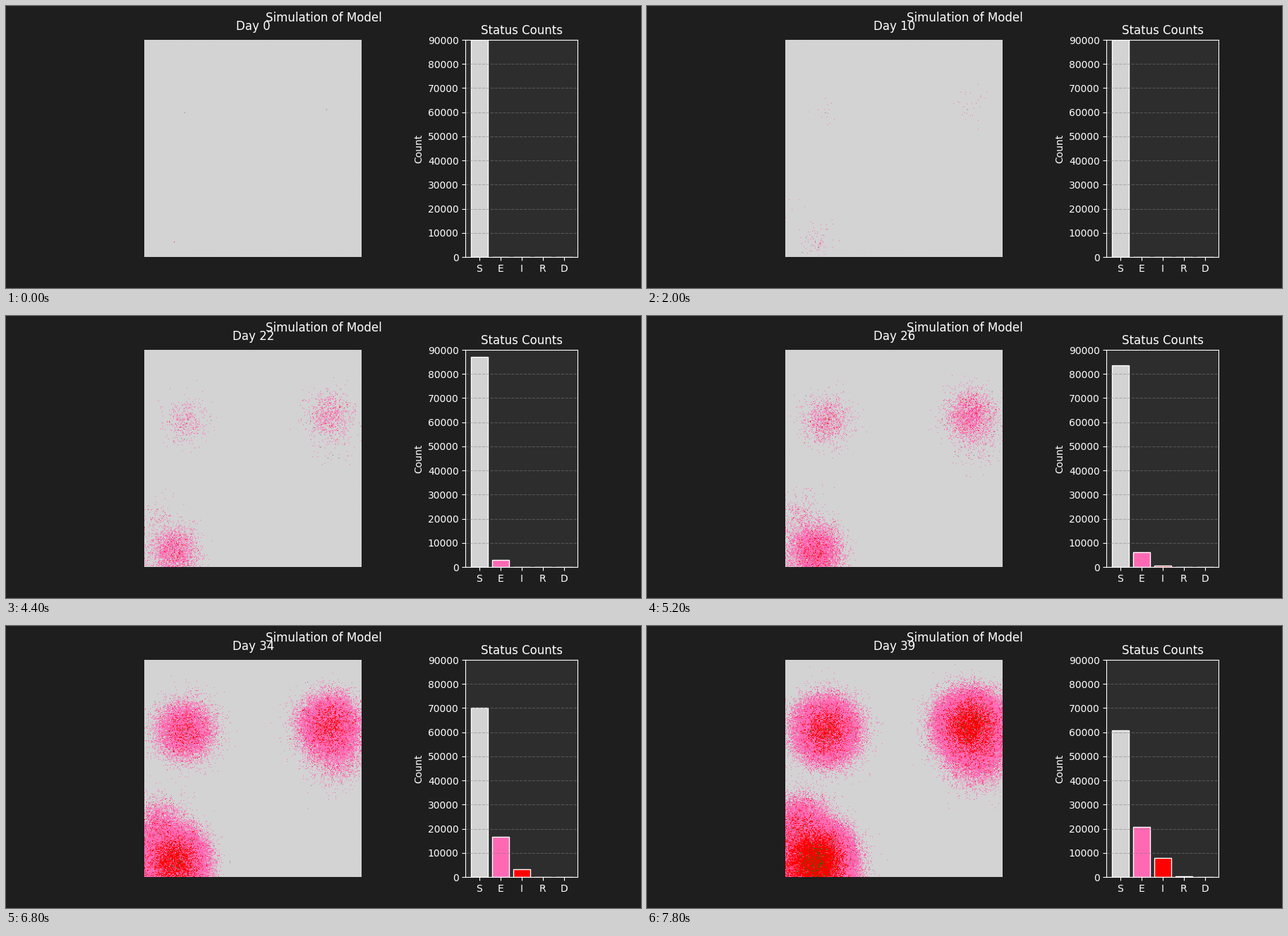
Recreate the animation shown at these times as a matplotlib script. Size 900x400 px, loop 8 s.

```python
import matplotlib.pyplot as plt
import numpy as np
from matplotlib.animation import FuncAnimation
from matplotlib.colors import to_rgb

SIZE, DAYS = 300, 40
BACK, PANEL = "#1e1e1e", "#2d2d2d"
COLORS = ["lightgray", "hotpink", "red", "green", "black"]
RGB = np.array([to_rgb(c) for c in COLORS])
DIM = to_rgb("#697373")

# Cumulative cases follow exp(START + RATE * t - DAMP * t**2)
START, RATE, DAMP = 1.1, 0.4164, 0.00464
GROWTH = 0.28                    # daily log growth of each outbreak
INFECT_LAG, RECOVER_LAG = 11.6, 25.6

# Outbreaks: cell x, y and log size on day 0
OUTBREAKS = [(41, 276, 1.5), (255, 91, 0.4), (56, 97, -0.4),
             (18, 231, -1.5), (266, 129, -2)]
# The first outbreak also piles up at the bottom and left walls
OUTBREAKS += [(41, 324, 1.5), (-41, 276, 1.5)]
SEEDS = [(279, 41), (100, 55), (96, 251)]

rng = np.random.default_rng(11)


def pressure(day):
    """Expected exposures per cell up to a day."""
    y, x = np.mgrid[:SIZE, :SIZE]
    var = 60 + 8 * day
    total = np.zeros((SIZE, SIZE))
    for cx, cy, log_size in OUTBREAKS:
        dist2 = (x - cx) ** 2 + (y - cy) ** 2
        total += np.exp(log_size + GROWTH * day - dist2 / (2 * var))
    return total / (2 * np.pi * var)


def raw_exposure():
    limit = rng.exponential(size=(SIZE, SIZE))
    when = np.full((SIZE, SIZE), np.inf)
    prev = np.zeros((SIZE, SIZE))
    for day in range(DAYS + 9):
        now = pressure(day)
        hit = (now >= limit) & np.isinf(when)
        when[hit] = day + (limit[hit] - prev[hit]) / (now[hit] - prev[hit])
        prev = now
    return when


def schedule(raw):
    """Turn the order of events into days on the cumulative curve."""
    rank = np.empty(raw.size)
    rank[np.argsort(raw, axis=None, kind="stable")] = np.arange(1, raw.size + 1)
    root = RATE ** 2 - 4 * DAMP * (np.log(rank) - START)
    when = (RATE - np.sqrt(np.maximum(root, 0))) / (2 * DAMP)
    return when.reshape(raw.shape)


raw_e = raw_exposure()
raw_i = raw_e + rng.normal(12, 1.4, raw_e.shape)
raw_r = raw_i + rng.normal(12, 2, raw_e.shape)
dim = rng.random(raw_e.shape) < 0.015
for cell in SEEDS:
    raw_e[cell] = -1
    dim[cell] = True

exposed = schedule(raw_e)
infected = schedule(raw_i) + INFECT_LAG
recovered = schedule(raw_r) + RECOVER_LAG
infected[SEEDS[0]] = 0


def state_on(day):
    state = (exposed <= day).astype(int)
    state[(state == 1) & (infected <= day)] = 2
    state[(state == 2) & (recovered <= day)] = 3
    return state


def paint(state):
    img = RGB[state]
    img[dim & (state == 1)] = DIM
    return img


fig, (ax, bar_ax) = plt.subplots(
    1, 2, figsize=(9, 4), dpi=100, facecolor=BACK,
    gridspec_kw={"width_ratios": [3, 1]})
fig.suptitle("Simulation of Model", color="white", fontsize=12)

image = ax.imshow(paint(state_on(0)))
ax.axis("off")
title = ax.set_title("Day 0", color="white", fontsize=12, pad=10)

bars = bar_ax.bar(list("SEIRD"), [0] * 5, color=COLORS,
                  edgecolor="white", linewidth=1)
bar_ax.set_facecolor(PANEL)
bar_ax.set_ylim(0, SIZE * SIZE)
bar_ax.set_yticks(range(0, 90001, 10000))
bar_ax.set_title("Status Counts", color="white", fontsize=12)
bar_ax.set_ylabel("Count", color="white")
bar_ax.tick_params(colors="white")
bar_ax.grid(axis="y", linestyle="--", color="gray", alpha=0.5)
for spine in bar_ax.spines.values():
    spine.set_color("white")


def update(day):
    state = state_on(day)
    image.set_data(paint(state))
    title.set_text(f"Day {day}")
    for bar, count in zip(bars, np.bincount(state.ravel(), minlength=5)):
        bar.set_height(count)
    return [image, title, *bars]


anim = FuncAnimation(fig, update, frames=DAYS, interval=200,
                     repeat=True, repeat_delay=0, blit=False)
plt.show()
```
